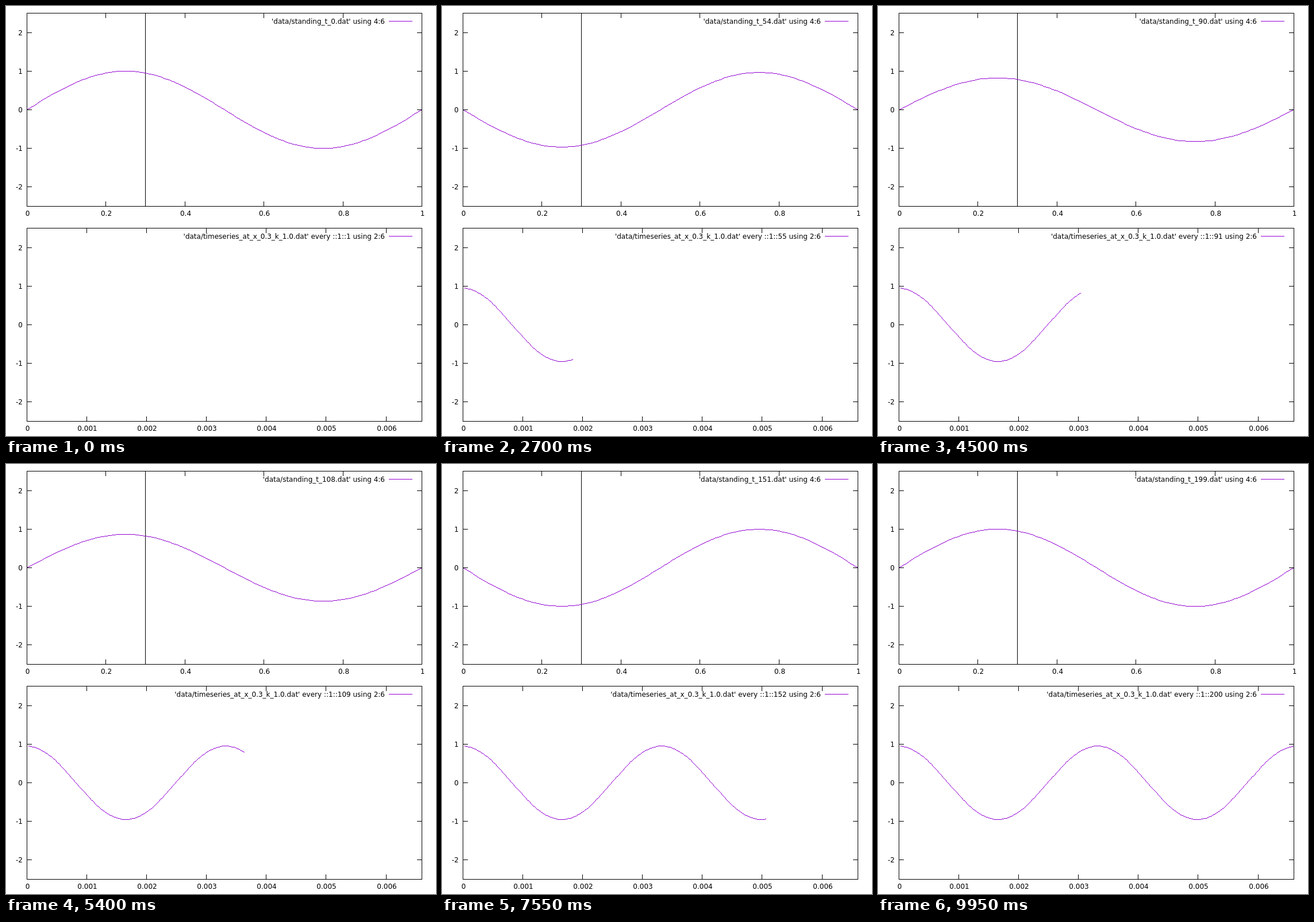
Animation, 748 px wide and 748 px high, one loop 10 s. Source, as an HTML page with a canvas:

```html
<!DOCTYPE html>
<html lang="en">
<head>
<meta charset="utf-8">
<title>Standing wave</title>
<style>
  html, body { margin: 0; width: 100%; height: 100%; overflow: hidden; background: #fff; }
  canvas { display: block; }
</style>
</head>
<body>
<canvas id="stage" width="748" height="748"></canvas>
<script>
const ctx = document.getElementById('stage').getContext('2d');
const LEFT = 36, RIGHT = 723, HALF = 168, UNIT = 67.2, TICK = 8;
const STEP_MS = 50, STEPS = 200, PERIOD = 100, PHASE = 0.0239;
const PROBE_X = 0.3, T_MAX = 0.0066, DT = 1 / 30000;
const INK = '#000', CURVE = '#9400d3';

const amplitude = step => Math.cos(2 * Math.PI * step / PERIOD + PHASE);
const shape = x => Math.sin(2 * Math.PI * x);
const column = fraction => Math.round(LEFT + fraction * (RIGHT - LEFT));
const row = (mid, value) => Math.round(mid - value * UNIT);

function hLine(x0, x1, y) { ctx.fillRect(x0, y, x1 - x0 + 1, 1); }
function vLine(x, y0, y1) { ctx.fillRect(x, y0, 1, y1 - y0 + 1); }

function label(text, x, y, align) {
  ctx.textAlign = align;
  ctx.fillText(text, x, y);
}

// One-pixel line without smoothing
function pixelLine([x0, y0], [x1, y1]) {
  const dx = x1 - x0, dy = y1 - y0;
  const count = Math.max(Math.abs(dx), Math.abs(dy), 1);
  for (let i = 0; i <= count; i++) {
    ctx.fillRect(Math.round(x0 + dx * i / count), Math.round(y0 + dy * i / count), 1, 1);
  }
}

function polyline(points) {
  ctx.fillStyle = CURVE;
  points.forEach((point, i) => pixelLine(points[Math.max(i - 1, 0)], point));
}

function drawAxes(mid, xMax, xStep) {
  const top = mid - HALF, bottom = mid + HALF;
  ctx.fillStyle = INK;
  hLine(LEFT, RIGHT, top);
  hLine(LEFT, RIGHT, bottom);
  vLine(LEFT, top, bottom);
  vLine(RIGHT, top, bottom);

  for (let v = -2; v <= 2; v++) {
    const y = row(mid, v);
    hLine(LEFT, LEFT + TICK, y);
    hLine(RIGHT - TICK, RIGHT, y);
    label(String(v), 29, y + 5, 'right');
  }
  for (let i = 0; i * xStep <= xMax + 1e-9; i++) {
    const value = i * xStep, x = column(value / xMax);
    vLine(x, top, top + TICK);
    vLine(x, bottom - TICK, bottom);
    label(String(+value.toFixed(4)), x + 1.5, bottom + 17, 'center');
  }
}

function drawKey(mid, text) {
  const y = mid - 154;
  ctx.fillStyle = INK;
  label(text, 659, y + 5, 'right');
  ctx.fillStyle = CURVE;
  hLine(666, 706, y);
}

function drawWave(step) {
  const mid = 180, size = amplitude(step);
  ctx.fillStyle = INK;
  vLine(column(PROBE_X), mid - HALF, mid + HALF);
  drawKey(mid, `'data/standing_t_${step}.dat' using 4:6`);
  polyline(Array.from({ length: 101 }, (_, i) =>
    [column(i / 100), row(mid, size * shape(i / 100))]));
  drawAxes(mid, 1, 0.2);
}

function drawHistory(step) {
  const mid = 554, last = step + 1;
  const shown = Math.min(last, Math.round(T_MAX / DT));
  drawKey(mid, `'data/timeseries_at_x_0.3_k_1.0.dat' every ::1::${last} using 2:6`);
  polyline(Array.from({ length: shown }, (_, i) =>
    [column((i + 1) * DT / T_MAX), row(mid, amplitude(i + 1) * shape(PROBE_X))]));
  drawAxes(mid, T_MAX, 0.001);
}

function draw(now) {
  const step = Math.floor(Math.max(now, 0) / STEP_MS) % STEPS;
  ctx.fillStyle = '#fff';
  ctx.fillRect(0, 0, 748, 748);
  ctx.font = '12px "DejaVu Sans", sans-serif';
  ctx.textBaseline = 'alphabetic';
  drawWave(step);
  drawHistory(step);
  requestAnimationFrame(draw);
}
draw(0);
</script>
</body>
</html>
```
